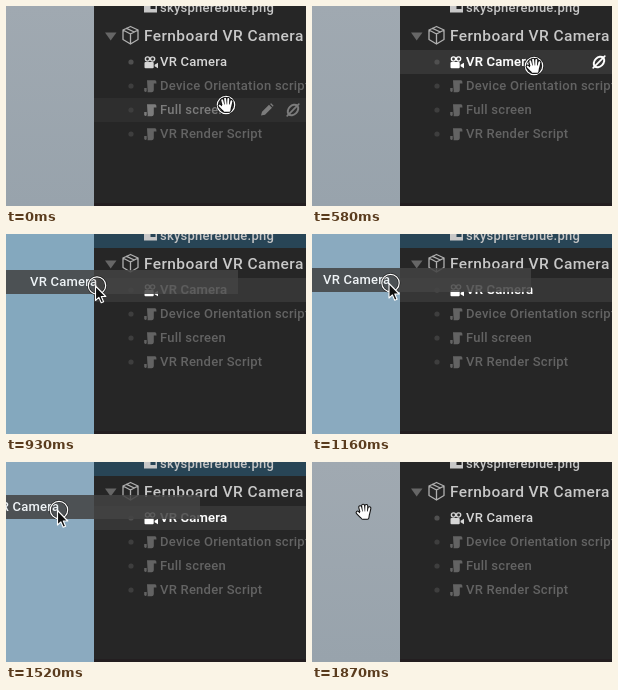
An HTML page that plays this animation: 300x200 px, repeating every 1970 ms.

```html
<!DOCTYPE html>
<html lang="en">
<head>
<meta charset="utf-8">
<title>Dragging an entity out of the hierarchy</title>
<style>
  html, body { margin: 0; width: 100%; height: 100%; overflow: hidden; background: #262626; }
  svg { display: block; width: 100vw; height: 100vh; }
  text { font: 500 13px Roboto, Arial, sans-serif; letter-spacing: .25px; fill: currentColor; }
  .title { font-size: 15.5px; letter-spacing: .4px; }
  .line { fill: none; stroke: currentColor; stroke-linecap: round; stroke-linejoin: round; }
  .fill { fill: currentColor; }
  .row { color: #636363; }
  .row.on { color: #d6d6d6; }
  .row .bg { fill: none; }
  .row .tools { display: none; }
  .row.hover { color: #7c7c7c; }
  .row.hover .bg { fill: #2e2e2e; }
  .row.on.hover { color: #fff; }
  .row.on.hover .bg { fill: #363636; }
  .row.on.hover text { stroke: #fff; stroke-width: .2px; }
  .row.hover.idle .tools { display: inline; }
</style>
</head>
<body>
<svg viewBox="0 0 300 200">
  <defs>
    <linearGradient id="sky" x2="0" y2="1">
      <stop stop-color="#a0a9b1"/><stop offset="1" stop-color="#98a3ac"/>
    </linearGradient>
    <g id="camera" class="fill">
      <circle cx="141.5" cy="-3" r="2.1" fill="none" stroke="currentColor" stroke-width="1.4"/>
      <circle cx="146.6" cy="-3" r="2.1" fill="none" stroke="currentColor" stroke-width="1.4"/>
      <rect x="138.5" y="0" width="9.2" height="6.3" rx="1"/>
      <path d="M148.6 2.7L152 .7V6.2L148.6 4.3Z"/>
    </g>
    <g id="script" class="fill">
      <path d="M141 -5.8H149.3Q150.6 -5.3 150.5 -2.5H147.8V4.3Q147.5 6.2 145.8 6.2H141.5Q142 5 141.5 3Z"/>
      <path d="M138.2 2H140.7V4.5Q140.7 6 139.5 6Q138.2 5.8 138.2 4.3Z"/>
    </g>
    <g id="link" class="line">
      <ellipse rx="6" ry="4.4" transform="rotate(-45)" stroke-width="2"/>
      <path d="M-5.800 5.800L5.800 -5.800" stroke-width="1.700"/>
    </g>
    <g id="pencil" class="fill">
      <path d="M-6 5.5L-5 1.8L2 -5.2L5 -2.2L-2 4.7ZM3 -6L4.2 -6.7L6.6 -4.2L5.8 -3.2Z"/>
    </g>
    <path id="palm" d="M-3.8 -4.8L-2.3 1M-.9 -6.3L-.2 0M2.3 -6L2.1 0M5.4 -3.8L4.1 2M-6.4 .6L-3 4M-3 .5H4.2L3.4 5.8H-1.3L-3.6 3Z"
      stroke-linecap="round" stroke-linejoin="round"/>
  </defs>

  <rect width="300" height="200" fill="#262626"/>
  <rect id="scene" width="88" height="200"/>
  <rect id="asset" x="88" width="212" height="14"/>
  <rect x="88" y="197" width="212" height="3" fill="#231e20"/>

  <g color="#c8c8c8">
    <path class="fill" fill-rule="evenodd" d="M138 -6H151V6.500H138ZM144.500 -3V3H149.500V-3Z"/>
    <text x="154" y="6.3">skysphereblue.png</text>
    <path d="M99 26.500H110.500L104.700 34.500Z" fill="#666"/>
    <path class="line" color="#b0b0b0" stroke-width="1.300" d="M124.500 20.500L132 24V33.500L124.500 38L117 33.500V24ZM117 24L124.500 28L132 24M124.500 28V38M120.500 22.300L128.300 26"/>
    <text class="title" x="138" y="34.500">Fernboard VR Camera</text>
  </g>

  <g id="rows"></g>

  <g id="ghost">
    <rect width="274" height="24" fill="#434343"/>
    <text x="66" y="16" color="#fff">VR Camera</text>
  </g>

  <g id="cursor">
    <g id="ring" fill="none">
      <circle r="8.700" stroke="#111" stroke-width="2.600" stroke-opacity=".7"/>
      <circle r="8.700" stroke="#fff" stroke-width="1.200"/>
    </g>
    <g id="hand">
      <use href="#palm" fill="#111" stroke="#111" stroke-width="4"/>
      <use href="#palm" fill="#fff" stroke="#fff" stroke-width="1.900"/>
    </g>
    <path id="arrow" d="M0 0V14.500L3.400 11.400L5.700 16.700L8.100 15.700L5.800 10.500H10.300Z"
      fill="#111" stroke="#fff" stroke-width="1.100" stroke-linejoin="round"/>
  </g>
</svg>
<script>
const LOOP = 1970;
const $ = id => document.getElementById(id);

const entities = ["VR Camera", "Device Orientation script", "Full screen", "VR Render Script"];
$("rows").innerHTML = entities.map((name, i) => `
  <g class="row ${i ? "" : "on"}" transform="translate(0 ${56 + 24 * i})">
    <rect class="bg" x="88" y="-12" width="212" height="24"/>
    <circle cx="125" r="2.600" fill="${i ? "#3e3e3e" : "#505050"}"/>
    <use href="#${i ? "script" : "camera"}"/>
    <text x="154" y="4.200">${name}</text>
    <g class="tools">
      <use href="#link" x="287"/>
      ${i ? '<use href="#pencil" x="261"/>' : ""}
    </g>
  </g>`).join("");
const rows = [...$("rows").children];

// [start ms, cursor, x, y, hovered row, scene tint, ghost opacity]
const steps = [
  [0, "press", 220, 99, 2],
  [110, "press", 220, 97, 2],
  [230, "press", 220, 88, 1],
  [340, "press", 221, 75, 1],
  [460, "press", 221, 64, 0],
  [580, "press", 222, 60, 0],
  [700, "drag", 209.5, 61, 0, "#86a8bd", .4],
  [810, "drag", 145, 57, 0, "#84a8be", .8],
  [930, "drag", 89.5, 52, 0, "#84a8be", .86],
  [1040, "drag", 81, 51, 0, "#87a9be", .86],
  [1160, "drag", 77, 49.5, 0, "#8aaabf", .86],
  [1280, "drag", 70, 49, 0, "#8baabf", .86],
  [1400, "drag", 58, 48.5, 0, "#8baabf", .86],
  [1520, "drag", 51.5, 48.5, 0, "#8baabf", .86],
  [1630, "open", 52, 50, 0],
  [1870, "open", 52, 50, -1]
];

const show = (id, on) => $(id).setAttribute("display", on ? "inline" : "none");
const move = (id, x, y) => $(id).setAttribute("transform", `translate(${x} ${y})`);

function pose([, mode, x, y, hover, tint, opacity]) {
  const dragging = mode === "drag";
  rows.forEach((row, i) => {
    row.classList.toggle("hover", i === hover);
    row.classList.toggle("idle", mode === "press");
  });
  $("scene").setAttribute("fill", tint || "url(#sky)");
  $("asset").setAttribute("fill", dragging ? "#284556" : "none");
  show("ghost", dragging);
  show("arrow", dragging);
  show("hand", !dragging);
  show("ring", mode !== "open");
  move("cursor", x, y);
  move("ring", dragging ? 1.5 : 0, dragging ? -.5 : 0);
  move("ghost", Math.round(x - 132), Math.round(y - 16));
  $("ghost").setAttribute("opacity", opacity || 0);
}

let current;
function tick(now) {
  const time = now % LOOP;
  const step = steps.findLast(([start]) => start <= time);
  if (step !== current) pose(current = step);
  requestAnimationFrame(tick);
}
pose(current = steps[0]);
requestAnimationFrame(tick);
</script>
</body>
</html>
```
